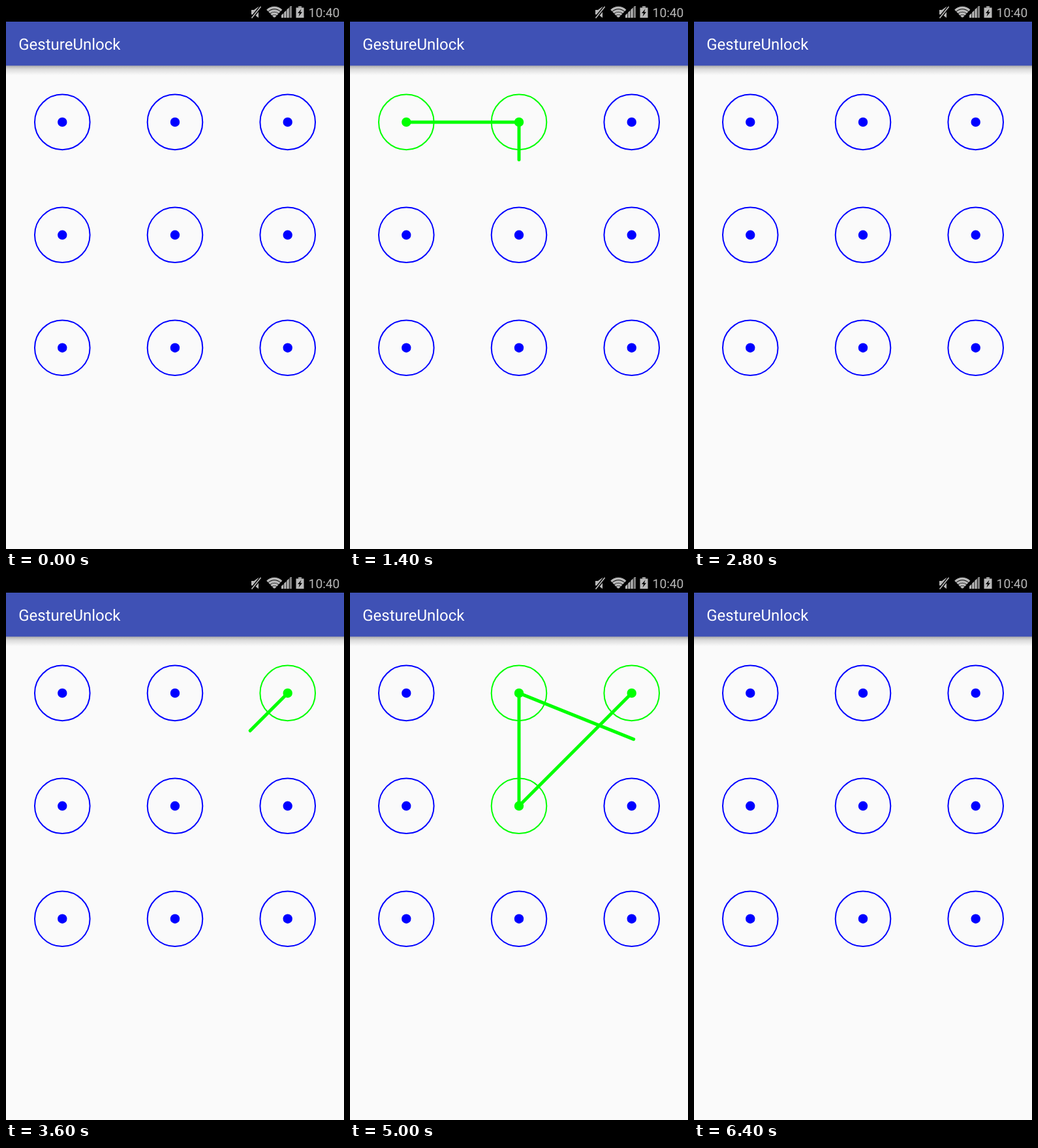
Animation of 518x832 px, one loop 8000 ms. Source, as an HTML page with a canvas:

```html
<!DOCTYPE html>
<html lang="en">
<head>
<meta charset="utf-8">
<title>GestureUnlock</title>
<style>
  html, body { margin: 0; width: 100%; height: 100%; overflow: hidden; background: #fafafa; }
  canvas { display: block; }
</style>
</head>
<body>
<canvas id="stage" width="518" height="832"></canvas>
<script>
const ctx = document.getElementById('stage').getContext('2d');
const LOOP = 8000, STEP = 100;
const BLUE = '#0000ff', GREEN = '#00ff00', ICON = '#b9b9b9';
const RADIUS = 42.3;

const point = (x, y) => ({ x, y });
const nodes = Array.from({ length: 9 }, (_, i) =>
  point(259 + (i % 3 - 1) * 172.7, 350.8 + (Math.floor(i / 3) - 1) * 172.9));

// The finger glides to each point between two times and rests in the gaps
const move = (from, until, to) => ({ from: from - STEP, until, to });

const gestures = [
  { start: 1000, end: 2800, origin: nodes[0], moves: [
    move(1100, 1300, nodes[1]),
    move(1400, 1600, nodes[4]),
    move(1800, 1900, point(427, 334)),
    move(2000, 2500, nodes[8])] },
  { start: 3500, end: 6400, origin: nodes[2], moves: [
    move(3600, 3800, nodes[4]),
    move(4000, 4200, point(245, 176)),
    move(4500, 4800, point(420, 238)),
    move(5000, 5200, point(464, 270)),
    move(5400, 5500, point(426, 324)),
    move(5600, 6000, nodes[8])] }
];

function fingerAt({ origin, moves }, t) {
  let pos = origin;
  for (const { from, until, to } of moves) {
    const p = Math.min(1, Math.max(0, (t - from) / (until - from)));
    pos = point(pos.x + (to.x - pos.x) * p, pos.y + (to.y - pos.y) * p);
  }
  return pos;
}

// Replays the gesture so the picked nodes depend on time alone
function trace(gesture, now) {
  const picked = [];
  let finger;
  for (let t = gesture.start; t <= now; t += STEP) {
    finger = fingerAt(gesture, t);
    const hit = nodes.find(n => Math.hypot(n.x - finger.x, n.y - finger.y) < RADIUS);
    if (hit && !picked.includes(hit)) picked.push(hit);
  }
  return { picked, finger };
}

function circle(x, y, r) {
  ctx.beginPath();
  ctx.arc(x, y, r, 0, Math.PI * 2);
}

function line(points, width, color) {
  ctx.strokeStyle = color;
  ctx.lineWidth = width;
  ctx.beginPath();
  points.forEach(p => ctx.lineTo(p.x, p.y));
  ctx.stroke();
}

function poly(points, color) {
  ctx.fillStyle = color;
  ctx.beginPath();
  points.forEach(([x, y]) => ctx.lineTo(x, y));
  ctx.fill();
}

function rect(x, y, w, h, color) {
  ctx.fillStyle = color;
  ctx.fillRect(x, y, w, h);
}

function text(str, x, y, size, color) {
  ctx.font = `${size}px Roboto, sans-serif`;
  ctx.fillStyle = color;
  ctx.fillText(str, x, y);
}

function muteIcon() {
  poly([[376, 6], [380, 6], [387, 1], [387, 18], [380, 13], [376, 13]], ICON);
  const slash = [point(390.5, 1), point(376.5, 18.5)];
  line(slash, 4.5, '#000');
  line(slash, 1.7, ICON);
}

function wifiIcon() {
  const x = 411.3, y = 18.5, spread = Math.PI * 0.24;
  ctx.strokeStyle = ICON;
  ctx.lineWidth = 3.5;
  for (let r = 3; r < 17; r += 4.3) {
    ctx.beginPath();
    ctx.arc(x, y, r, -Math.PI / 2 - spread, -Math.PI / 2 + spread);
    ctx.stroke();
  }
}

function signalIcon() {
  for (let i = 0; i < 4; i++) {
    const x = 422 + i * 4.2, top = 14 - i * 4.2;
    poly([[x, 18], [x, top], [x + 3.3, top - 3], [x + 3.3, 18]], i < 3 ? ICON : '#858585');
  }
}

function batteryIcon() {
  rect(444.5, 2.5, 12, 15.5, ICON);
  rect(448, 0.5, 5, 2, ICON);
  poly([[452.5, 4.5], [447, 11], [450, 11], [448.5, 16], [454, 9.3], [451, 9.3]], '#000');
}

function drawChrome() {
  rect(0, 0, 518, 832, '#fafafa');
  const shade = ctx.createLinearGradient(0, 91, 0, 106);
  shade.addColorStop(0, 'rgba(0,0,0,.32)');
  shade.addColorStop(0.4, 'rgba(0,0,0,.12)');
  shade.addColorStop(1, 'rgba(0,0,0,0)');
  rect(0, 91, 518, 15, shade);
  rect(0, 24, 518, 67.4, '#3f51b5');
  rect(0, 0, 518, 24, '#000');
  ctx.textRendering = 'geometricPrecision';
  text('GestureUnlock', 19.2, 67, 24, '#fff');
  text('10:40', 463.6, 16.8, 19.2, ICON);
  muteIcon();
  wifiIcon();
  signalIcon();
  batteryIcon();
}

function drawNode({ x, y }, color) {
  ctx.strokeStyle = ctx.fillStyle = color;
  ctx.lineWidth = 2;
  circle(x, y, RADIUS);
  ctx.stroke();
  circle(x, y, 7.2);
  ctx.fill();
}

function draw(t) {
  drawChrome();
  const active = gestures.find(g => t >= g.start && t < g.end);
  const { picked, finger } = active ? trace(active, t) : { picked: [] };
  nodes.forEach(n => drawNode(n, picked.includes(n) ? GREEN : BLUE));
  if (!active) return;
  ctx.save();
  ctx.lineCap = ctx.lineJoin = 'round';
  line([...picked, finger], 5, GREEN);
  ctx.restore();
}

const start = performance.now();
function tick() {
  const t = (performance.now() - start) % LOOP;
  draw(Math.floor(t / STEP) * STEP);
  requestAnimationFrame(tick);
}
tick();
</script>
</body>
</html>
```
